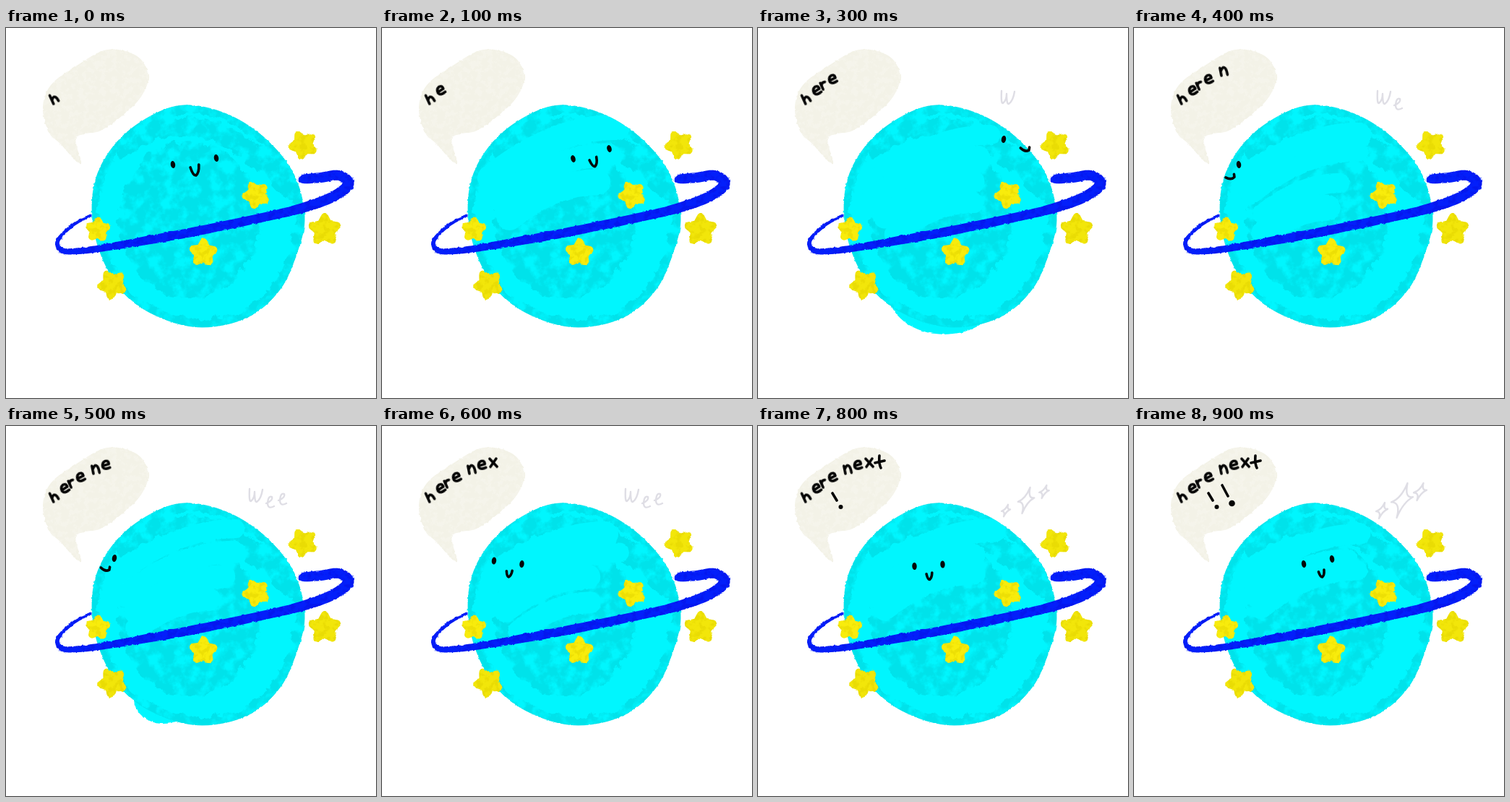
These frames come from a looping animation (512x512 px, 1 s). An HTML page:

```html
<!DOCTYPE html>
<html lang="en">
<head>
<meta charset="utf-8">
<title>here next!!</title>
<style>
html, body { margin: 0; width: 100%; height: 100%; overflow: hidden; background: #fff; }
svg { display: block; width: 100vw; height: 100vh; }
.ink, .pale { fill: none; stroke-linecap: round; stroke-linejoin: round; }
.ink { stroke: #050505; stroke-width: 3.6; }
.pale { stroke: #dfdee5; stroke-width: 2.4; }
</style>
</head>
<body>
<svg id="stage" viewBox="0 0 512 512" role="img" aria-label="here next!!">
  <defs>
    <filter id="rough" filterUnits="userSpaceOnUse" x="0" y="0" width="512" height="512" color-interpolation-filters="sRGB">
      <feTurbulence type="fractalNoise" baseFrequency=".2" numOctaves="2" seed="4"/>
      <feColorMatrix values="1 0 0 0 0  0 1 0 0 0  0 0 1 0 0  0 0 0 0 1" result="n"/>
      <feDisplacementMap in="SourceGraphic" in2="n" scale="3" xChannelSelector="R" yChannelSelector="G"/>
    </filter>
    <filter id="chalk" filterUnits="userSpaceOnUse" x="0" y="0" width="512" height="512" color-interpolation-filters="sRGB">
      <feTurbulence type="fractalNoise" baseFrequency=".06" numOctaves="5" seed="9" result="n"/>
      <feColorMatrix in="n" values="0 0 0 0 0  0 0 0 0 0  0 0 0 0 0  4 0 0 0 -1.3" result="mask"/>
      <feColorMatrix in="n" values="1 0 0 0 0  0 1 0 0 0  0 0 1 0 0  0 0 0 0 1" result="push"/>
      <feDisplacementMap in="SourceGraphic" in2="push" scale="18" xChannelSelector="R" yChannelSelector="G" result="edge"/>
      <feComposite in="edge" in2="mask" operator="in"/>
    </filter>
    <filter id="grain" filterUnits="userSpaceOnUse" x="0" y="0" width="512" height="512" color-interpolation-filters="sRGB">
      <feTurbulence type="fractalNoise" baseFrequency=".13" numOctaves="3" seed="2"/>
      <feColorMatrix values="0 0 0 0 0  0 0 0 0 0  0 0 0 0 0  6 0 0 0 -2.8" result="mask"/>
      <feComposite in="SourceGraphic" in2="mask" operator="in"/>
    </filter>
    <clipPath id="disc"><path id="discPath"/></clipPath>
  </defs>
</svg>
<script>
const NS = 'http://www.w3.org/2000/svg';
const stage = document.getElementById('stage');
const LOOP = 1000, STEPS = 10;
const LIGHT = '#00f6fe', DARK = '#00e2ea';

let seed = 17;
const rnd = () => (seed = seed * 16807 % 2147483647) / 2147483647;
const parse = s => s.split(' ').map(p => p.split(',').map(Number));
const mix = (a, b) => a.map((v, i) => (v + b[i]) / 2);

function add(tag, attrs, parent = stage) {
  const el = document.createElementNS(NS, tag);
  for (const k in attrs) el.setAttribute(k, attrs[k]);
  return parent.appendChild(el);
}

// Catmull-Rom point between b and c
const spline = (a, b, c, e, t) => b.map((_, k) => .5 * (2 * b[k] + (c[k] - a[k]) * t
  + (2 * a[k] - 5 * b[k] + 4 * c[k] - e[k]) * t * t
  + (3 * b[k] - a[k] - 3 * c[k] + e[k]) * t * t * t));

function blob(s) {
  const p = parse(s), n = p.length, line = [];
  for (let i = 0; i < n * 8; i++) {
    const at = k => p[((i >> 3) + k + n) % n];
    line.push(spline(at(-1), at(0), at(1), at(2), i % 8 / 8));
  }
  return 'M' + line.join('L') + 'Z';
}

// Open brush stroke with changing width; points are x,y,width
function ribbon(s) {
  const p = parse(s), last = p.length - 1, line = [], left = [], right = [];
  for (let i = 0; i < last * 10; i++) {
    const at = k => p[Math.min(Math.max(Math.floor(i / 10) + k, 0), last)];
    line.push(spline(at(-1), at(0), at(1), at(2), i % 10 / 10));
  }
  line.push(p[last]);
  line.forEach(([x, y, w], i) => {
    const a = line[Math.max(i - 1, 0)], b = line[Math.min(i + 1, line.length - 1)];
    const dx = b[0] - a[0], dy = b[1] - a[1], h = w / 2 / Math.hypot(dx, dy);
    left.push([x - dy * h, y + dx * h]);
    right.unshift([x + dy * h, y - dx * h]);
  });
  return 'M' + left.concat(right).join('L') + 'Z';
}

// Visible from step a up to step b, in every loop
function show(el, a, b) {
  const key = (opacity, at) => ({ opacity, offset: at / STEPS, easing: 'step-end' });
  const keys = [key(a ? 0 : 1, 0)];
  if (a) keys.push(key(1, a));
  if (b < STEPS) keys.push(key(0, b));
  keys.push(key(b < STEPS ? 0 : 1, STEPS));
  el.animate(keys, { duration: LOOP, iterations: Infinity });
}
const scenes = parent => Array.from({ length: STEPS }, (_, i) => {
  const g = add('g', {}, parent);
  show(g, i, i + 1);
  return g;
});

// Speech bubble
const bubble = blob('104,187 92,179 75,160 59,144 51,110 62,79 98,52 140,30 180,38 197,65 187,95 160,122 131,142 111,146 97,152 99,168');
add('path', { d: bubble, fill: '#f3f2e7', filter: 'url(#rough)' });
add('path', { d: bubble, fill: '#faf9f3', opacity: .4, filter: 'url(#grain)' });

// Planet, with a lump of paint slipping out below
const outline = blob('256,107 310,121 360,154 398,202 413,260 403,310 379,362 335,400 272,414 212,400 162,366 130,310 119,250 129,196 162,149 212,116');
document.getElementById('discPath').setAttribute('d', outline);
const lumps = scenes(stage);
const lump = (i, cx, cy, rx, ry) => add('ellipse', { cx, cy, rx, ry, fill: LIGHT, filter: 'url(#rough)' }, lumps[i]);
lump(3, 258, 365, 78, 59);
lump(5, 218, 378, 41, 34);
add('path', { d: outline, fill: LIGHT, stroke: DARK, 'stroke-width': .8, filter: 'url(#rough)' });

const skin = add('g', { 'clip-path': 'url(#disc)', fill: 'none', 'stroke-linecap': 'round' });
const chalk = { stroke: DARK, filter: 'url(#chalk)' };
add('path', { ...chalk, d: outline, 'stroke-width': 22 }, skin);
add('path', { ...chalk, d: 'M165 165Q270 85 395 225', 'stroke-width': 26 }, skin);
add('ellipse', { cx: 254, cy: 266, rx: 98, ry: 108, fill: DARK, filter: 'url(#chalk)' }, skin);

// Each step brushes different light sweeps over the dark middle
scenes(skin).forEach((g, i) => {
  const sweeps = i ? 2 + Math.round(2 * Math.sin(i / STEPS * Math.PI)) : 0;
  for (let k = 0; k < sweeps; k++) {
    const x = 150 + k * 10 + rnd() * 12, y = 205 + k * 24 + rnd() * 10, len = 150 - k * 22 + rnd() * 30;
    add('path', { d: `M${x} ${y}q${len * .5} ${-len * .4} ${len} ${-len * .4}`, stroke: LIGHT, 'stroke-width': 26 + rnd() * 12, filter: 'url(#rough)' }, g);
  }
});

// Orbit ring
const orbit = ribbon('118,259,4 95,271,4.5 76,288,5 71,299,6 78,308,7.5 95,309,8.5 130,305,9.5 200,293,12 260,282,12.5 370,259,12.5 420,246,14 455,232,14.5 474,216,15 461,204,14 435,207,14 411,209,12 405,208,3');
add('path', { d: orbit, fill: '#031ffa', filter: 'url(#rough)' });
add('path', { d: orbit, fill: '#0808d4', opacity: .3, filter: 'url(#grain)' });
const laps = scenes(stage)[2];
for (const [cx, cy] of [[201, 303], [333, 273]])
  add('ellipse', { cx, cy, rx: 15, ry: 6, fill: LIGHT, transform: `rotate(-9 ${cx} ${cy})` }, laps);

// Puffy five-pointed star; turn is the angle of its first tip
function star(x, y, r, turn, color) {
  let d = '';
  for (let k = 0; k < 10; k++) {
    const a = (turn + k * 36) * Math.PI / 180, q = k % 2 ? r * .52 : r;
    d += (k ? 'L' : 'M') + [x + q * Math.cos(a), y + q * Math.sin(a)];
  }
  const look = { d: d + 'Z', 'stroke-width': 10, 'stroke-linejoin': 'round' };
  add('path', { ...look, fill: color, stroke: color, filter: 'url(#rough)' });
  add('path', { ...look, fill: '#e2d300', stroke: '#e2d300', opacity: .5, filter: 'url(#grain)' });
}
star(411, 162, 15.5, -116, '#f2e60a');
star(441, 279, 18, -90, '#f2e60a');
star(346, 231, 14.5, -115, '#f8ec0c');
star(273, 311, 15, -88, '#f8ec0c');
star(127, 279, 12.5, -87, '#f8ec0c');
star(147, 355, 16, -118, '#f2e60a');

// Face: left eye, right eye, mouth; steps without a pose lie halfway
const poses = {
  0: '231,189 291,180 262,198',
  2: '298,173 338,154 325,175',
  3: '340,154 395,164 369,168',
  4: '108,194 145,189 133,207',
  5: '112,176 150,183 137,198',
  7: '198,197 237,199 214.5,212',
  9: '235,191 274,184 260,205'
};
const pose = i => poses[i] ? parse(poses[i]) : pose(i - 1).map((p, k) => mix(p, pose(i + 1)[k]));
scenes(stage).forEach((g, i) => {
  const [l, r, m] = pose(i);
  const turn = Math.atan2(r[1] - l[1], r[0] - l[0]) * 180 / Math.PI;
  const side = Math.abs(m[0] - 260) > 100;
  const size = side ? 1 : Math.hypot(r[0] - l[0], r[1] - l[1]) / 60;
  const eyes = add('g', { 'clip-path': 'url(#disc)' }, g);
  for (const [cx, cy] of [l, r])
    add('ellipse', { cx, cy, rx: 3.2, ry: 5, fill: '#050505', transform: `rotate(${turn} ${cx} ${cy})` }, eyes);
  add('path', {
    class: 'ink',
    d: side ? 'M-6 -1Q1 4 6 0L6 -4' : 'M-6 -6Q-4 6 0 6Q5 3 6 -8',
    transform: `translate(${m}) rotate(${turn}) scale(${size})`,
    'vector-effect': 'non-scaling-stroke'
  }, g);
});

// Lettering follows a curve and is typed one sign per step
const glyphs = {
  h: 'M-4 -7L-4 6M-4 1Q-1 -4 2 -2Q4 0 4 5',
  e: 'M-4.5 1L4.5 -1Q4.5 -6 0 -5.5Q-5 -4 -4.5 2Q-3 7 5.5 4',
  r: 'M-2.5 -4.5L-1.5 5M-2 0Q-1 -5 4 -4',
  n: 'M-4.5 -5L-4 6M-4 0Q0 -8 3 -3Q4.5 0 4.5 6',
  x: 'M-5 -5L5 6M4 -5L-4 6',
  t: 'M0 -9Q-1 2 2 8M-6 1L7 -2'
};
const places = [67, 81, 90, 103, 124, 138, 154, 168];
[...'herenext'].forEach((c, i) => {
  const x = places[i], run = Math.max(158 - x, 0);
  const y = 50 + 48 * (run / 91) ** 1.65;
  show(add('path', { d: glyphs[c], class: 'ink', transform: `translate(${x} ${y}) rotate(${-run * .27})` }), i, STEPS);
});
for (const k of [0, 1]) {
  const g = add('g', { transform: `translate(${103 + 19 * k} ${93 - 11 * k})` });
  add('path', { d: `M0 0L${6 + 2 * k} ${10 + 5 * k}`, class: 'ink' }, g);
  add('circle', { cx: 11.5 + 2 * k, cy: 19 + 6 * k, r: 3 + 1.3 * k, fill: '#050505' }, g);
  show(g, 8 + k, STEPS);
}

// Faint cheer that grows, crumbles and ends as sparkles
const cheer = scenes(stage);
const pale = (i, x, y, d) => add('path', { d, class: 'pale', transform: `translate(${x} ${y})` }, cheer[i]);
for (let i = 3; i < 7; i++) {
  pale(i, 346, 96, 'M-9 -9Q-10 9 -7 8Q-2 4 -2 -5Q-2 10 1 9Q7 5 9 -8');
  for (let k = 0; k < Math.min(i - 3, 2); k++)
    pale(i, 365 + 17 * k, 106 - 4 * k, 'M-5 1Q5 -3 3 -8Q-2 -10 -3 0Q-3 10 6 5');
}
for (let k = 0; k < 36; k++)
  pale(7, 342 + k % 12 * 4.5 + rnd() * 3, 91 + Math.floor(k / 12) * 9 + rnd() * 7, `M0 0l${rnd() * 4 - 2} ${rnd() * 5 - 2}`);

const sparkle = (i, x, y, w, h) =>
  pale(i, x, y, `M${w / 2} ${-h}Q${w * .2} ${-h * .1} ${w} ${-h * .2}Q${w * .1} ${h * .1} ${-w / 2} ${h}Q${-w * .1} ${h * .1} ${-w} ${h * .1}Q${-w * .1} ${-h * .1} ${w / 2} ${-h}Z`);
for (const i of [8, 9]) {
  const grow = i === 9 ? 1 : .75;
  sparkle(i, 343, 117, 8 * grow, 11 * grow);
  sparkle(i, 371, 103, 15 * grow, 24 * grow);
  sparkle(i, 396, 91, 9 * grow, 12 * grow);
}
</script>
</body>
</html>
```
